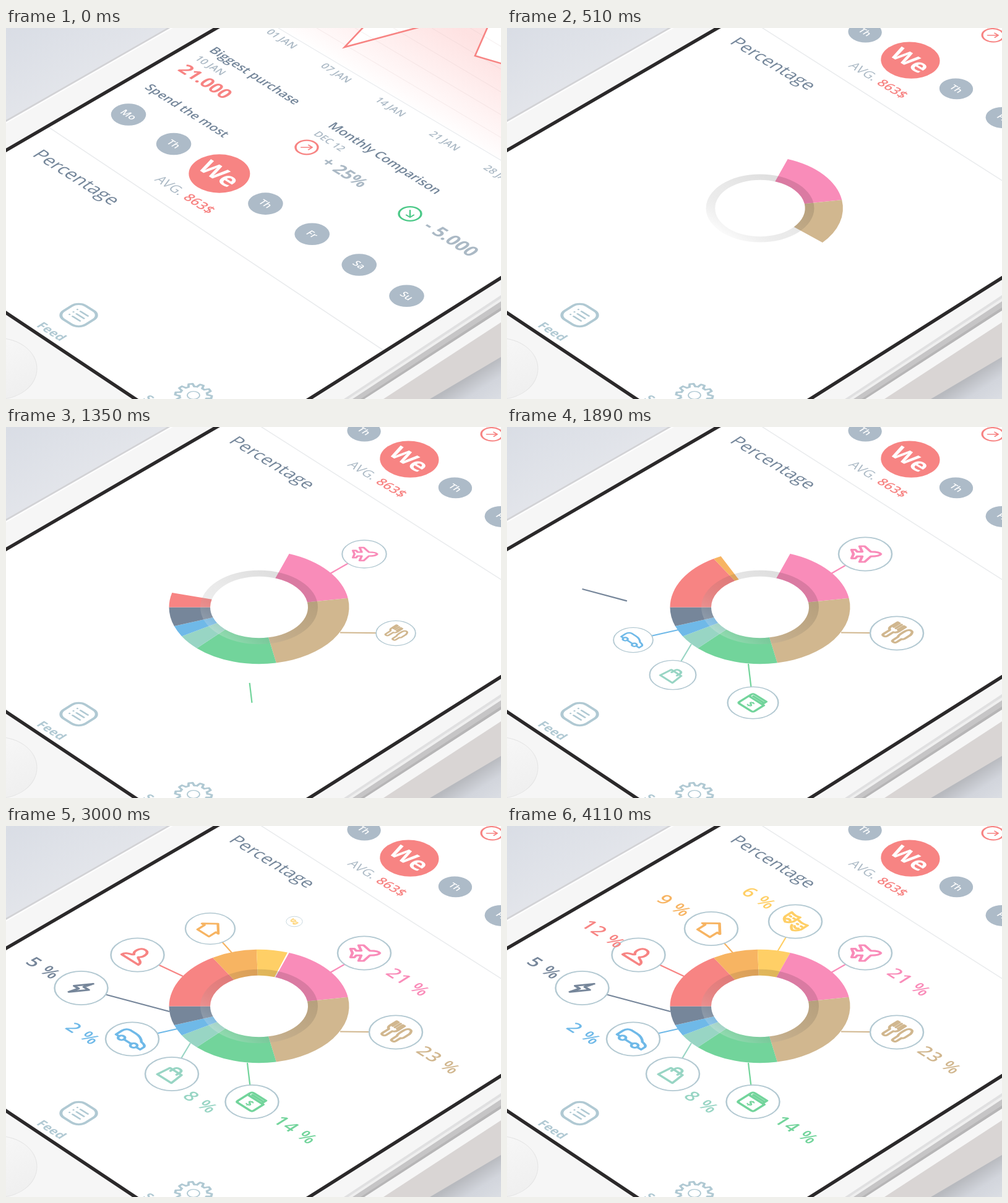
Write an HTML page with a canvas that moves like this. It is 800x600 px and loops after 5.83 s.

```html
<!DOCTYPE html>
<html lang="en">
<head>
<meta charset="utf-8">
<title>Spending overview</title>
<style>
html, body { margin: 0; width: 100%; height: 100%; overflow: hidden; background: #f6f6f6; }
canvas { display: block; }
</style>
</head>
<body>
<canvas id="stage" width="800" height="600"></canvas>
<script>
const ctx = document.getElementById('stage').getContext('2d');
const LOOP = 5830, TILT = 0.63, TAU = Math.PI * 2, RAD = Math.PI / 180;
const RED = '#f78483', SLATE = '#74869a', GRAY = '#abb9c5', TAB = '#b0c9d3';

// Linear interpolation through [time, value] pairs.
function track(t, keys) {
  if (t <= keys[0][0]) return keys[0][1];
  for (let i = 1; i < keys.length; i++) {
    const [t0, a] = keys[i - 1], [t1, b] = keys[i];
    if (t < t1) return a + (b - a) * (t - t0) / (t1 - t0);
  }
  return keys[keys.length - 1][1];
}
const clamp = v => Math.max(0, Math.min(1, v));
const easeInOut = p => p < 0.5 ? 4 * p ** 3 : 1 - (2 - 2 * p) ** 3 / 2;

// Runs draw() in the tilted plane of the phone screen, with its origin at x, y.
function onPlane(x, y, draw, scale = 1) {
  ctx.save();
  ctx.translate(x, y);
  ctx.scale(scale, scale * TILT);
  ctx.rotate(Math.PI / 4);
  draw();
  ctx.restore();
}
function text(str, x, y, size, color, weight = 400, align = 'left', spacing = 0) {
  onPlane(x, y, () => {
    ctx.font = `${weight} ${size}px "Open Sans", "Noto Sans", sans-serif`;
    ctx.letterSpacing = spacing + 'px';
    ctx.textAlign = align;
    ctx.fillStyle = color;
    ctx.fillText(str, 0, 0);
  });
}
function poly(points, fill) {
  ctx.beginPath();
  points.forEach(([x, y]) => ctx.lineTo(x, y));
  ctx.closePath();
  if (fill) { ctx.fillStyle = fill; ctx.fill(); }
}
function line(points, color, width) {
  ctx.beginPath();
  points.forEach(([x, y]) => ctx.lineTo(x, y));
  ctx.strokeStyle = color;
  ctx.lineWidth = width;
  ctx.stroke();
}
function disc(x, y, rx, ry, fill) {
  ctx.beginPath();
  ctx.ellipse(x, y, rx, ry, 0, 0, TAU);
  ctx.fillStyle = fill;
  ctx.fill();
}
function gradient(x0, y0, x1, y1, ...colors) {
  const g = ctx.createLinearGradient(x0, y0, x1, y1);
  colors.forEach((c, i) => g.addColorStop(i / (colors.length - 1), c));
  return g;
}
function strokePath(d, color, width) {
  ctx.strokeStyle = color;
  ctx.lineWidth = width;
  ctx.lineJoin = ctx.lineCap = 'round';
  ctx.stroke(new Path2D(d));
}

const SCREEN = [[-20, 209.5], [380, -23], [840, -22], [840, 378.7], [440, 631.6], [250, 627.2], [-20, 447.2]];

function drawPhone() {
  ctx.fillStyle = '#f6f6f6';
  ctx.fillRect(0, 0, 800, 600);
  poly([[0, 0], [265, 0], [0, 152]], gradient(0, 0, 75, 130, '#d9dde5', '#e4e6eb'));
  line([[-10, 156], [275, -7]], '#d2d2d5', 2.5);
  line([[-10, 159], [275, -4]], '#fdfdfd', 2);

  // Bands of the lower right side: x where each meets the bottom, y where it meets the right.
  [[546, 432, '#e0e0e1'], [553, 437, '#efefef'], [560, 442, '#c6c5c6'], [573, 452, '#b6b5b6'],
   [579, 457, '#f6f6f6'], [610, 476, '#d9d5d4']]
    .forEach(([x, y, color]) => poly([[x, 600], [800, y], [800, 600]], color));
  poly([[685, 600], [800, 532], [800, 600]], gradient(745, 566, 775, 612, '#b8babf', '#d2d5dc', '#dadde3'));

  disc(-13, 551, 63.5, 50, '#e4e4e4');
  disc(-13, 551, 62.5, 49, gradient(-20, 505, 20, 600, '#f7f7f7', '#efefef'));
}

function drawChart() {
  poly([[440, -1], [577, -1], [547, 31], [664, -1], [778, -1], [758, 45], [801, 57], [801, 214]],
    gradient(610, 105, 690, -25, 'rgba(255,200,200,0)', 'rgba(253,208,208,.62)'));
  for (let i = 0; i < 6; i++) {
    line([[440 + i * 62, 0], [800 + i * 62, 214]], i ? 'rgba(215,190,190,.2)' : '#e9ebee', 1.2);
  }
  ctx.lineJoin = 'miter';
  line([[597, -22], [547, 31], [700, -10]], RED, 2.6);
  line([[783, -12], [758, 45], [830, 66]], RED, 2.6);
  ['01', '07', '14', '21', '28'].forEach((day, i) =>
    text(day + ' JAN', 419.5 + i * 87.7, 7 + i * 55, 19.5, GRAY, 600));
}

function badge(x, y, color, turn) {
  onPlane(x, y, () => {
    ctx.beginPath();
    ctx.arc(0, 0, 18, 0, TAU);
    ctx.strokeStyle = color;
    ctx.lineWidth = 3.4;
    ctx.stroke();
    ctx.rotate(turn);
    strokePath('M-9 0H9M3-6L9 0L3 6', color, 2.4);
  });
}

function drawPage(scroll) {
  ctx.save();
  ctx.transform(1 - 0.039 * scroll, 0, 0.05 * scroll, 1 - 0.05 * scroll, 308.7 * scroll, -171.6 * scroll);
  drawChart();
  text('Biggest purchase', 327, 37, 24, SLATE, 600);
  text('10 JAN', 304, 50, 19.5, GRAY, 600);
  text('21.000', 276, 68, 34, RED, 700);
  text('Spend the most', 223, 97, 23.9, SLATE, 600);
  text('Monthly Comparison', 519, 159, 24.5, SLATE, 600);
  text('DEC 12', 496, 172, 19, GRAY, 600);
  badge(486, 193, RED, -Math.PI / 4);
  text('+ 25%', 507, 218, 32, GRAY, 700);
  badge(653, 300.5, '#4cc988', Math.PI / 4);
  text('- 5.000', 672, 322, 34.8, GRAY, 700);

  // The spacing widens slightly with the perspective.
  ['Mo', 'Th', 'We', 'Th', 'Fr', 'Sa', 'Su'].forEach((day, i) => {
    const big = day === 'We';
    const x = 198 + i * 72.7 + i * i * 0.37, y = 140 + i * 47.2 + i * i * 0.28;
    const rx = big ? 49.5 : 28.3, size = big ? 47 : 18.5;
    disc(x, y, rx, rx * TILT, big ? RED : '#adbbc8');
    text(day, x - size * 0.25, y + size * 0.16, size, '#fff', big ? 700 : 600, 'center');
  });
  text('AVG.', 239, 246, 26, GRAY);
  text('863$', 285, 275, 26, RED, 600);
  line([[0, 114.5], [70, 161.2], [800, 648]], '#e9ebed', 1.6);
  text('Percentage', 41, 206, 35, SLATE);
  ctx.restore();
}

function drawTabs() {
  onPlane(117.5, 464.5, () => {
    ctx.beginPath();
    ctx.roundRect(-25, -25, 50, 50, 16);
    ctx.strokeStyle = TAB;
    ctx.lineWidth = 5;
    ctx.stroke();
    strokePath('M-5-9H12M-5 0H12M-5 9H12M-12-9h.1M-12 0h.1M-12 9h.1', TAB, 3.4);
  });
  text('Feed', 48, 482, 23.7, TAB, 700);
  onPlane(303, 594, () => {
    ctx.beginPath();
    for (let a = 0; a < 360; a += 3) {
      const r = 26 + 3.5 * Math.max(-1, Math.min(1, 2 * Math.cos(a * RAD * 10)));
      ctx.lineTo(r * Math.cos(a * RAD), r * Math.sin(a * RAD));
    }
    ctx.closePath();
    ctx.strokeStyle = TAB;
    ctx.lineWidth = 4;
    ctx.stroke();
    ctx.beginPath();
    ctx.arc(0, 0, 10, 0, TAU);
    ctx.lineWidth = 2;
    ctx.stroke();
  });
  text('Settings', 220, 600, 23.7, TAB, 700);
}

// end: angle where the slice stops; rim/at: ends of the leader; pop, link, count: start times.
const ITEMS = [
  { color: '#f98cb9', end: -9.2, rim: [524, 237], at: [579, 205.5], label: [612, 239], value: 21,
    pop: 1110, link: 1020, count: 2160, turn: -Math.PI / 4,
    icon: 'M25 0Q23-6 9-6L-1-20h-8l4 14h-8l-3-5h-6l3 11l-3 11h6l3-5h8l-4 14h8L9 6Q23 6 25 0Z' },
  { color: '#d1b78f', end: 79, rim: [540, 332.5], at: [630, 333.5], label: [661, 365], value: 23,
    pop: 1190, link: 1110, count: 2220,
    icon: 'M-19-21V-6Q-19 0-14 2V16Q-14 20-10 20T-6 16V2Q-1 0-1-6V-21H-5V-8M-10-21V-8M-15-8V-21H-19M6-14Q7-21 12-21T19-12V0Q19 4 16 5V16Q16 20 12 20T8 16V5Q5 3 6-14Z' },
  { color: '#72d49b', end: 133.8, rim: [390, 383], at: [397.5, 446], label: [430, 478], value: 14,
    pop: 1400, link: 1290, count: 2430,
    icon: 'M-18-13V14Q-18 18-14 18H14Q18 18 18 14V-8H-13Q-18-8-18-13Q-18-18-13-18H14V-8M-12-13H14' },
  { color: '#98d5c4', end: 149.2, rim: [298, 351], at: [268, 401], label: [284, 438], value: 8,
    pop: 1580, link: 1470, count: 2520,
    icon: 'M-13-9H13L16 17H-16ZM-7-4V-11Q-7-18 0-18T7-11V-4' },
  { color: '#6fb9e8', end: 160.5, rim: [277, 328], at: [204, 344.5], label: [94, 327], value: 2,
    pop: 1730, link: 1620, count: 2640,
    icon: 'M-9 10H8M19 10H28V1Q26-4 16-5Q7-14-6-14H-18Q-27-13-27-3V10H-20M-20 10a5.500 5.500 0 1 0 11 0a5.500 5.500 0 1 0-11 0M8 10a5.500 5.500 0 1 0 11 0a5.500 5.500 0 1 0-11 0' },
  { color: '#76869a', end: 180, rim: [264, 300], at: [121.5, 262], label: [30, 221], value: 5,
    pop: 1940, link: 1830, count: 2760, icon: 'M6-21L-12 4H-2L-7 21L12-5H1Z' },
  { color: RED, end: 239, rim: [286, 243], at: [212.5, 208.5], label: [118, 161], value: 12,
    pop: 2210, link: 2090, count: 3060,
    icon: 'M-5 3C-12-2-11-18 0-18S12-2 5 3C5 7 19 6 19 17H-19C-19 6-5 7-5 3Z' },
  { color: '#f7b462', end: 268.4, rim: [365, 205], at: [330, 166], label: [240, 120], value: 9,
    pop: 2540, link: 2310, count: 3420, icon: 'M-20 0L0-19L20 0H14V17H-14V0Z' },
  { color: '#ffcf66', end: 289.5, rim: [437, 203], at: [466, 154.5], label: [377, 108], value: 6,
    pop: 2955, link: 3600, count: 3930,
    icon: 'M-21-13Q-11-9-2-13V2Q-4 9-11 12Q-20 8-21 2ZM2-6Q11-3 21-7V8Q19 16 12 19Q5 16 2 10M-16-4h2M-8-4h2M-15 5Q-11 1-7 5M6 2h2M15 2h2M7 9Q12 14 16 9' }
];
const POP = [[0, 0], [90, 0.6], [115, 1.19], [160, 0.74], [240, 0.83], [310, 0.87], [430, 0.91], [490, 0.95], [600, 1]];
const SWEEP = [[90, 1], [510, 0.831], [1350, 0.513], [1890, 0.355], [2370, 0.232], [3000, 0.055], [3690, 0]];
const GROW = [[390, 0], [510, 0.92], [720, 1.055], [900, 1]];
const START = -70.5;

// Ring sector between two radii, angles in degrees.
function sector(outer, inner, from, to, fill) {
  ctx.beginPath();
  ctx.arc(0, 0, outer, from * RAD, to * RAD);
  ctx.arc(0, 0, inner, to * RAD, from * RAD, true);
  ctx.closePath();
  ctx.fillStyle = fill;
  ctx.fill();
}
function drawDonut(t) {
  const scale = track(t, GROW);
  if (!scale) return;
  const limit = START + 360 * (1 - track(t, SWEEP) ** 2);
  ctx.save();
  ctx.translate(409, 291.5);
  ctx.scale(scale, scale * TILT);
  ITEMS.forEach(({ color, end }, i) => {
    const from = i ? ITEMS[i - 1].end : START;
    if (limit > from) sector(145.5, 79, from, Math.min(end, limit), color);
  });
  sector(95, 79, 0, 360, gradient(50, -55, -75, 65, 'rgba(0,0,0,.125)', 'rgba(95,95,95,.13)', 'rgba(245,245,245,.26)'));
  ctx.restore();
}

function drawItem(item, t) {
  const { color, rim, at, label, value, icon, turn = 0 } = item;
  const reach = clamp((t - item.link) / 120);
  ctx.lineCap = 'butt';
  if (reach) line([at, at.map((v, i) => v + (rim[i] - v) * reach)], color, 2.2);

  const scale = track(t - item.pop, POP);
  if (scale) onPlane(...at, () => {
    ctx.beginPath();
    ctx.arc(0, 0, 43, 0, TAU);
    ctx.fillStyle = '#fff';
    ctx.fill();
    ctx.strokeStyle = '#b3c9d2';
    ctx.lineWidth = 2.5;
    ctx.stroke();
    ctx.rotate(turn);
    strokePath(icon, color, 4.6);
    if (value === 14) {
      ctx.font = '700 19px "Open Sans", "Noto Sans", sans-serif';
      ctx.letterSpacing = '0px';
      ctx.textAlign = 'center';
      ctx.fillStyle = color;
      ctx.fillText('$', 0, 12);
    }
  }, scale);

  if (t >= item.count) {
    const shown = Math.min(value, Math.floor((t - item.count) / 30));
    text(shown + ' %', ...label, 34, color, 600, 'left', 2);
  }
}

function render(t) {
  drawPhone();
  poly(SCREEN, '#fff');
  ctx.save();
  ctx.clip();
  drawPage(easeInOut(clamp((t - 15) / 450)));
  drawDonut(t);
  ITEMS.forEach(item => drawItem(item, t));
  drawTabs();
  ctx.restore();
  poly(SCREEN);
  ctx.strokeStyle = '#2b292a';
  ctx.lineWidth = 5.5;
  ctx.stroke();
}

const began = performance.now();
function frame() {
  render((performance.now() - began) % LOOP);
  requestAnimationFrame(frame);
}
frame();
</script>
</body>
</html>
```
